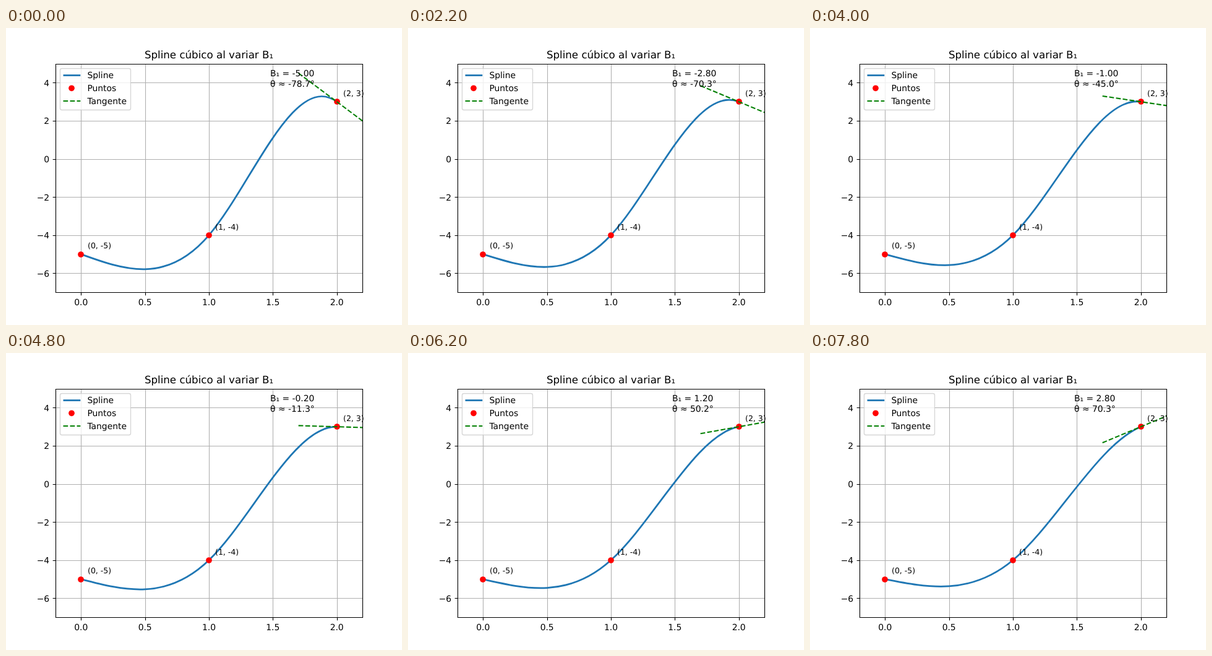
Write an HTML page that moves like this. It is 640 px wide and 480 px high and loops after 8000 ms.

```html
<!DOCTYPE html>
<html lang="es">
<head>
<meta charset="utf-8">
<title>Spline cúbico</title>
<style>
  html, body { margin: 0; width: 100%; height: 100%; overflow: hidden; background: #fff; }
  svg { display: block; width: 640px; height: 480px; }
  text { font: 13.889px "DejaVu Sans", sans-serif; fill: #000; text-rendering: geometricPrecision; white-space: pre; }
  .title { font-size: 16.667px; text-anchor: middle; }
  .note { font-size: 12.5px; }
  .x { text-anchor: middle; }
  .y { text-anchor: end; }
  path { fill: none; }
  .grid { stroke: #b0b0b0; stroke-width: 1.11; }
  .axis { stroke: #000; stroke-width: 1.11; }
  .spline { stroke: #1f77b4; stroke-width: 2.78; stroke-linejoin: round; }
  .tangent { stroke: #008000; stroke-width: 2.08; stroke-dasharray: 7.71 3.33; }
  .dot { fill: #f00; }
  .box { fill: #fff; fill-opacity: .8; stroke: #ccc; stroke-opacity: .8; stroke-width: 1.39; }
</style>
</head>
<body>
<svg viewBox="0 0 640 480">
  <clipPath id="area"><rect x="80" y="58" width="496" height="369"/></clipPath>
  <path class="grid" id="grid"/>
  <path class="axis" id="ticks"/>
  <g clip-path="url(#area)">
    <path class="spline" id="spline"/>
    <g id="dots"></g>
    <path class="tangent" id="tangent"/>
  </g>
  <path class="axis" d="M80.5 58.5H576.5V427.5H80.5Z"/>
  <g id="labels"></g>
  <text class="title" x="328" y="49">Spline cúbico al variar B₁</text>
  <text id="slope" x="427" y="78"></text>
  <text id="angle" x="427" y="95"></text>
  <rect class="box" x="87.5" y="65.5" width="114" height="67" rx="2.8"/>
  <path class="spline" d="M92.5 76.5h27.8"/>
  <circle class="dot" cx="106" cy="97.3" r="4.86"/>
  <path class="tangent" d="M92.5 118h27.8"/>
  <text x="131.4" y="81">Spline</text>
  <text x="131.4" y="102">Puntos</text>
  <text x="131.4" y="123">Tangente</text>
</svg>
<script>
const $ = id => document.getElementById(id);
const px = x => 80 + (x + 0.2) * 496 / 2.4;
const py = y => 57.6 + (5 - y) * 30.8;
const at = (x, y) => `${px(x).toFixed(3)} ${py(y).toFixed(3)} `;
const snap = v => Math.round(v) + 0.5;
const label = (cls, x, y, text) =>
  $('labels').insertAdjacentHTML('beforeend', `<text class="${cls}" x="${x}" y="${y}">${text}</text>`);

const points = [[0, -5], [1, -4], [2, 3]];

let grid = '', ticks = '';
for (let x = 0; x <= 2; x += 0.5) {
  grid += `M${snap(px(x))} 58V427`;
  ticks += `M${snap(px(x))} 427.5v4.86`;
  label('x', px(x), 448, x.toFixed(1));
}
for (let y = -6; y <= 4; y += 2) {
  grid += `M80 ${snap(py(y))}H576`;
  ticks += `M80.5 ${snap(py(y))}h-4.86`;
  label('y', 70.2, Math.round(py(y) + 5.3), String(y).replace('-', '−'));
}
$('grid').setAttribute('d', grid);
$('ticks').setAttribute('d', ticks);

for (const [x, y] of points) {
  $('dots').insertAdjacentHTML('beforeend',
    `<circle class="dot" cx="${Math.round(px(x))}" cy="${Math.round(py(y))}" r="4.86"/>`);
  label('note', Math.round(px(x + 0.05)), Math.round(py(y + 0.3)), `(${x}, ${y})`);
}

// Natural at the left end, clamped to slope b at the right end.
function splinePath(b) {
  const mid = (22.5 - b) / 3.5;
  const slopes = [(3 - mid) / 2, mid, b];
  let d = 'M' + at(...points[0]);
  for (let i = 0; i < 2; i++) {
    const [x0, y0] = points[i], [x1, y1] = points[i + 1];
    d += 'C' + at(x0 + 1 / 3, y0 + slopes[i] / 3)
       + at(x1 - 1 / 3, y1 - slopes[i + 1] / 3) + at(x1, y1);
  }
  return d;
}

let shown = -1;
function draw() {
  const step = Math.floor(performance.now() % 8000 / 200);
  if (step !== shown) {
    shown = step;
    const b = (step - 25) / 5;
    $('spline').setAttribute('d', splinePath(b));
    $('tangent').setAttribute('d', 'M' + at(1.7, 3 - 0.3 * b) + 'L' + at(2.3, 3 + 0.3 * b));
    $('slope').textContent = `B₁ = ${b.toFixed(2)}`;
    $('angle').textContent = `θ ≈ ${(Math.atan(b) * 180 / Math.PI).toFixed(1)}°`;
  }
  requestAnimationFrame(draw);
}
draw();
</script>
</body>
</html>
```
